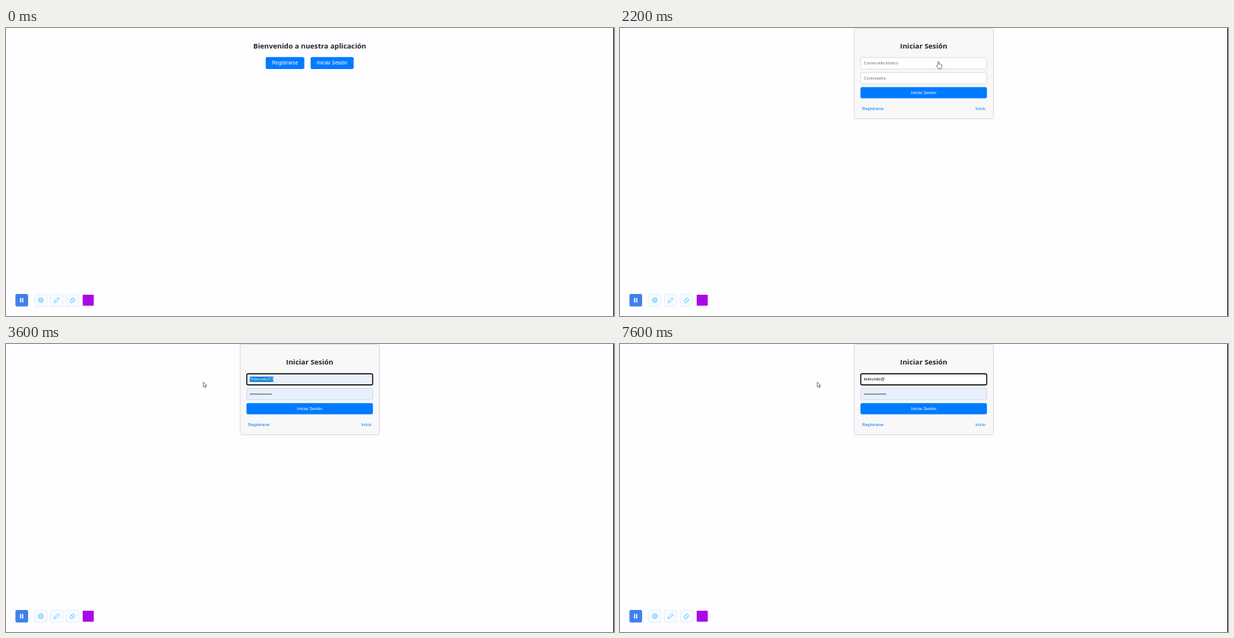
Animation, 800 px wide and 379 px high, one loop 8000 ms. Source, as an HTML page:

```html
<!DOCTYPE html>
<html lang="es">
<head>
<meta charset="utf-8">
<title>Iniciar Sesión</title>
<style>
html, body { margin: 0; width: 100%; height: 100%; overflow: hidden; background: #fefdff; }
svg { display: block; width: 100%; height: 100%; }
text { font: 5.555px "Liberation Sans", Arial, sans-serif; fill: #111; }
.title { font: 700 9.35px "Open Sans", "Noto Sans", sans-serif; fill: #212529; }
.mid { text-anchor: middle; }
.big { font-size: 6.667px; }
.white { fill: #fff; }
.link, .blue { fill: #007bff; }
.hint { fill: #757575; }
.field { fill: #fff; stroke: #c9cbce; stroke-width: .6; }
.tool { fill: #f6fbff; stroke: #dcebf5; stroke-width: .7; }
.icon { fill: none; stroke: #45bdf0; stroke-width: .8; stroke-linejoin: round; }
.pointer { fill: #fff; stroke: #333; stroke-width: .6; stroke-linejoin: round; }
</style>
</head>
<body>
<svg viewBox="0 0 800 379" preserveAspectRatio="none">
  <rect width="800" height="379" fill="#fefdff"/>
  <rect x="799" width="1" height="379" fill="#252528"/>

  <g id="home">
    <text class="title mid" x="399.6" y="27.2">Bienvenido a nuestra aplicación</text>
    <rect class="blue" x="341.7" y="38.2" width="50.8" height="15.8" rx="2"/>
    <text class="big white mid" x="367.1" y="48.3">Registrarse</text>
    <rect id="enter" x="400.8" y="38.2" width="56.7" height="15.8" rx="2"/>
    <text class="big white mid" x="429.1" y="48.3">Iniciar Sesión</text>
  </g>

  <g id="login">
    <rect x="308.1" y=".3" width="183.3" height="119.1" rx="2" fill="#f8f8f9" stroke="#cfd0d3" stroke-width=".7"/>
    <text class="title mid" x="399.7" y="27.4">Iniciar Sesión</text>
    <rect id="user" class="field" x="316.6" y="39" width="166" height="15" rx="2"/>
    <rect id="pass" class="field" x="316.6" y="58.4" width="166" height="15" rx="2"/>
    <rect id="ring" x="316.8" y="39.2" width="165.7" height="14.6" rx="1.8" fill="none" stroke="#101010" stroke-width="1.4"/>
    <rect id="select" x="320.8" y="43" width="32" height="6.8" fill="#0078d7"/>
    <text id="name" x="320.8" y="48.4"></text>
    <rect id="caret" y="43.2" width=".6" height="6.4" fill="#111"/>
    <text id="passHint" class="hint" x="320.8" y="67.8">Contraseña</text>
    <path id="dots" d="M321.8 65.9h27.4" stroke="#111" stroke-width="1.4" stroke-linecap="round" stroke-dasharray="0 1.95"/>
    <rect class="blue" x="316.4" y="77.8" width="166.4" height="14.7" rx="2"/>
    <text class="white mid" x="399.6" y="87.1">Iniciar Sesión</text>
    <text class="link" x="318.5" y="107.8">Registrarse</text>
    <text class="link" x="467.8" y="107.8">Inicio</text>
  </g>

  <g id="toolbar">
    <rect x="12.4" y="350" width="16.7" height="16.5" rx="2" fill="#3f80ec"/>
    <path d="M19.3 355.2v6M22 355.2v6" stroke="#fff" stroke-width="1.5"/>
    <rect class="tool" x="37.6" y="350.2" width="16.4" height="16.2" rx="2"/>
    <rect class="tool" x="58.4" y="350.2" width="16.4" height="16.2" rx="2"/>
    <rect class="tool" x="79.2" y="350.2" width="16.4" height="16.2" rx="2"/>
    <g class="icon">
      <circle cx="45.8" cy="358.2" r="3.2"/>
      <circle cx="45.8" cy="358.2" r="1.5"/>
      <path d="M63.4 361.5l.6-2.3 4.4-4.4 1.7 1.7-4.4 4.4z"/>
      <path d="M84.1 359l3.9-4 2.9 2.8-3.8 3.8h-1.3zM86 357l2.9 2.8"/>
    </g>
    <rect x="100.9" y="351" width="14.6" height="14.4" rx=".8" fill="#ab07e6"/>
  </g>

  <path id="arrow" class="pointer" d="M0 0v6.6l1.5-1.4 1.1 2.4 1-.5-1-2.3h2z"/>
  <path id="hand" class="pointer" d="M-.8 4.9V.6q.8-1.1 1.6 0v3q.8-.7 1.4.1 .8-.5 1.3.3 1-.2 1 .8v2.3l-.9 2.6h-3.7l-2.4-3.3q-.2-1.1.7-.9z"/>
</svg>
<script>
const LOOP = 8000;
const SAVED = "TebrundoZO", TYPED = "tebrundo@";
const KEYS = [4200, 4400, 4600, 5000, 5200, 5400, 5400, 5800, 6800];
// start time, pointer shape, x, y
const POINTER = [
  [0], [400, "arrow", 352, 128], [600, "arrow", 396, 78],
  [800, "hand", 423, 46], [1000, "hand", 419, 44], [2400],
  [3400, "arrow", 302, 48], [3600, "arrow", 259.6, 50]
];
const $ = id => document.getElementById(id);
const show = (id, on) => $(id).style.display = on ? "" : "none";
const between = (t, a, b) => t >= a && t < b;

function drawPointer(t) {
  const [, shape, x, y] = POINTER.filter(p => p[0] <= t).pop();
  for (const id of ["arrow", "hand"]) show(id, id === shape);
  if (shape) $(shape).setAttribute("transform", `translate(${x} ${y})`);
}

function drawForm(t) {
  const filled = t >= 2400, typing = t >= KEYS[0], selected = between(t, 3400, KEYS[0]);
  const name = $("name");
  name.textContent = typing ? TYPED.slice(0, KEYS.filter(k => k <= t).length)
    : filled ? SAVED : "Correo electrónico";
  name.style.fill = selected ? "#fff" : filled ? "" : "#757575";
  $("user").style.fill = filled && !typing ? "#e8f0fe" : "";
  $("pass").style.fill = filled ? "#e8f0fe" : "";
  show("passHint", !filled);
  show("dots", filled);
  show("ring", t >= 3200);
  show("select", selected);
  const width = name.getComputedTextLength();
  $("select").setAttribute("width", width);
  $("caret").setAttribute("x", 320.8 + width);
  show("caret", typing && !between(t, 6200, 6400) && t < 7200);
}

function draw(t) {
  const home = t < 2200;
  show("home", home);
  show("login", !home);
  $("enter").style.fill = between(t, 800, 2200) ? "#0056b3" : "#007bff";
  if (!home) drawForm(t);
  drawPointer(t);
}

const start = performance.now();
function tick() {
  draw((performance.now() - start) % LOOP);
  requestAnimationFrame(tick);
}
tick();
</script>
</body>
</html>
```
